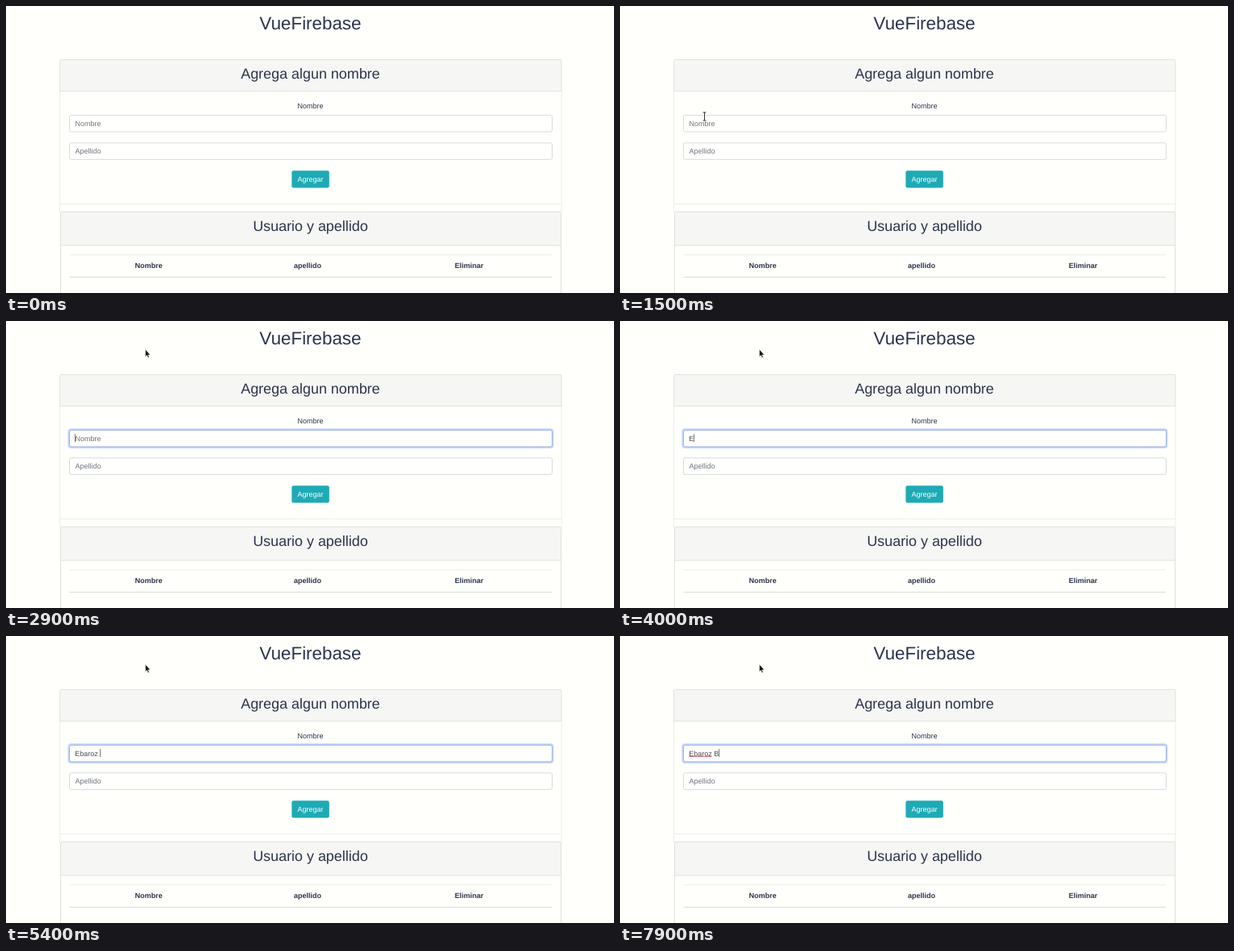
Animation, 752 px wide and 356 px high, one loop 8000 ms. Source, as an HTML page:

```html
<!DOCTYPE html>
<html lang="es">
<head>
<meta charset="utf-8">
<title>VueFirebase</title>
<style>
  html, body { margin: 0; width: 100%; height: 100%; overflow: hidden; background: #fffffc; }
  svg { display: block; width: 752px; height: 356px; }
  text { font-family: "Liberation Sans", Arial, sans-serif; font-size: 9px; fill: #2c344b; text-rendering: geometricPrecision; white-space: pre; }
  .mid { text-anchor: middle; }
  .h1 { font-size: 22.34px; }
  .h2 { font-size: 17.9px; }
  .th { font-weight: bold; }
  .hint { fill: #6f757b; }
  .value { fill: #495057; }
  .head { fill: #f6f6f4; }
  .edge { fill: none; stroke: #ebeee9; }
  .rule { fill: none; stroke: #dde1db; }
  .field { fill: #fffffd; stroke: #ced4d6; stroke-width: .8; }
</style>
</head>
<body>
<svg viewBox="0 0 752 356">
  <rect width="752" height="356" fill="#fffffc"/>
  <text class="mid h1" x="376.5" y="28.9">VueFirebase</text>

  <rect class="head" x="67" y="66" width="620" height="40"/>
  <path class="edge" d="M66.6 256V106M687 106V256M67 245.5H687"/>
  <path class="rule" d="M66.6 106V68.5Q66.6 66.4 69 66.4H685Q687 66.4 687 68.5V106M67 105.6H687" stroke-width=".9"/>
  <text class="mid h2" x="376.5" y="90.2">Agrega algun nombre</text>
  <text class="mid" x="376.5" y="127">Nombre</text>

  <rect id="glow" x="77.3" y="134.2" width="599.2" height="23" rx="3.2" fill="none" stroke="#c6d6fb" stroke-width="1.8"/>
  <rect class="field" x="78.5" y="135.4" width="597" height="20.6" rx="2.2"/>
  <rect id="ring" x="78.5" y="135.4" width="597" height="20.6" rx="2.2" fill="none" stroke="#8fabf3" stroke-width=".8"/>
  <text id="hint" class="hint" x="85.5" y="148.8">Nombre</text>
  <text id="value" class="value" x="85.3" y="148.8"></text>
  <path id="spell" d="M85.3 149.5H113.6" stroke="#d9536a" stroke-width=".8"/>
  <rect id="caret" y="140.2" width=".8" height="9.8" fill="#555b61"/>

  <rect class="field" x="78.5" y="169.8" width="597" height="20.6" rx="2.2"/>
  <text class="hint" x="85.5" y="183.3">Apellido</text>
  <rect x="353.4" y="204.3" width="46.4" height="21.1" rx="2.2" fill="#1eaab5"/>
  <text class="mid" x="376.5" y="217.8" style="fill:#fffffd">Agregar</text>

  <rect class="head" x="67.5" y="255" width="619" height="42"/>
  <path class="rule" d="M67.5 356V257.4Q67.5 255.3 69.7 255.3H684.5Q686.6 255.3 686.6 257.4V356M67.5 297H686.6"/>
  <text class="mid h2" x="376.5" y="279.1">Usuario y apellido</text>
  <path class="edge" d="M78.5 308.7H675"/>
  <path class="rule" d="M78.5 336.4H675" stroke-width="1.2"/>
  <text class="mid th" x="176.6" y="325.2">Nombre</text>
  <text class="mid th" x="373" y="325.2">apellido</text>
  <text class="mid th" x="572.7" y="325.2">Eliminar</text>

  <path id="arrow" d="M0 0V9.3L2 7.5L3.4 10.6L4.9 9.9L3.5 7H6.2Z" fill="#111" stroke="#fff" stroke-width=".6" stroke-linejoin="round"/>
  <g id="beam" fill="none">
    <path d="M-1.9-5H1.9M0-5V5M-1.9 5H1.9" stroke="#fff" stroke-width="2"/>
    <path d="M-1.9-5H1.9M0-5V5M-1.9 5H1.9" stroke="#333"/>
  </g>
</svg>
<script>
const LOOP = 8000;
const NAME = "Ebaroz Budeo";
const $ = id => document.getElementById(id);

// [time, x, y, pointer shape]
const pointer = [
  [0, 0, 0, ""],
  [400, 692, 333, "arrow"], [500, 560, 262, "arrow"], [600, 420, 185, "arrow"],
  [700, 344, 156, "arrow"], [800, 362, 190, "arrow"], [900, 377, 209, "arrow"],
  [1200, 330, 190, "arrow"], [1300, 220, 160, "arrow"], [1400, 115, 134, "beam"],
  [1500, 104.5, 137, "beam"], [1700, 103.5, 143, "beam"], [1900, 102.7, 142.6, "beam"],
  [2300, 125, 108, "arrow"], [2400, 154, 62, "arrow"], [2500, 168, 39.2, "arrow"],
  [2700, 172.3, 35.1, "arrow"]
];

// [time, number of typed letters]
const typed = [
  [0, 0], [3600, 1], [4400, 2], [4600, 3], [4900, 4], [5000, 5], [5400, 7],
  [5800, 8], [6000, 9], [6200, 10], [6400, 11], [6600, 12],
  [7000, 11], [7200, 10], [7500, 9], [7700, 8]
];

const caretStates = [[0, 0], [2000, 1], [2700, 0], [2900, 1], [3100, 0], [3600, 1]];

const at = (steps, t) => steps.filter(s => s[0] <= t).pop();
const fade = (id, amount) => $(id).setAttribute("opacity", amount);

function draw(t) {
  const [, x, y, shape] = at(pointer, t);
  for (const id of ["arrow", "beam"]) {
    fade(id, +(id === shape));
    $(id).setAttribute("transform", `translate(${x} ${y})`);
  }

  const focus = t < 1900 ? 0 : Math.min(1, (Math.floor(t / 100) - 18) / 3);
  fade("glow", focus);
  fade("ring", focus);

  const count = at(typed, t)[1];
  const value = $("value");
  value.textContent = NAME.slice(0, count);
  fade("hint", +(count === 0));
  fade("spell", +(t >= 5600));
  $("caret").setAttribute("x", 85.2 + (count ? value.getComputedTextLength() : 0));
  fade("caret", at(caretStates, t)[1]);
}

function tick() {
  draw(performance.now() % LOOP);
  requestAnimationFrame(tick);
}
tick();
</script>
</body>
</html>
```
